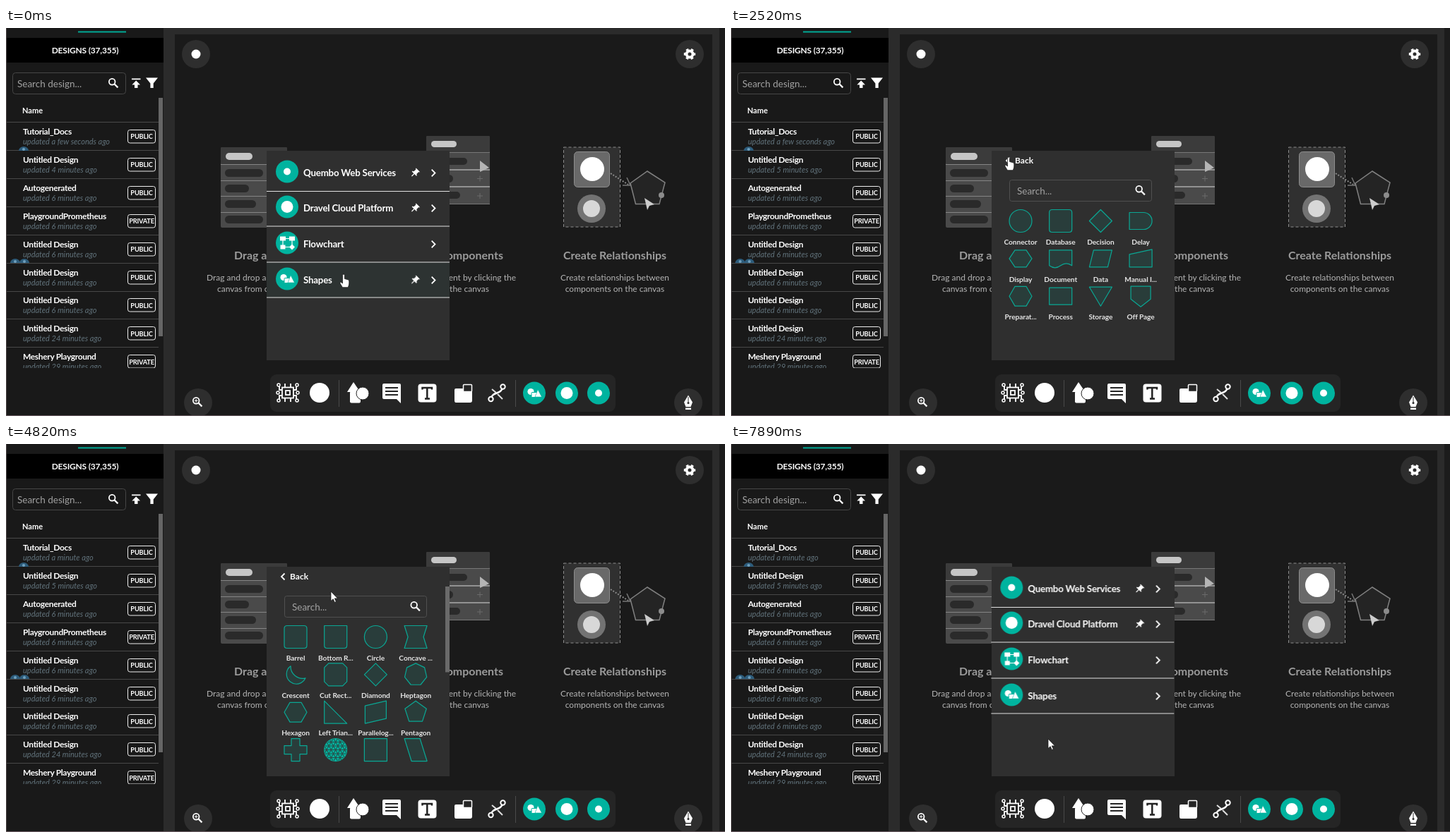
Write an HTML page that moves like this. It is 1018 px wide and 550 px high and loops after 8 s.

```html
<!DOCTYPE html>
<html lang="en">
<head>
<meta charset="utf-8">
<title>Design canvas</title>
<style>
html,body{margin:0;width:100%;height:100%;overflow:hidden;background:#1a1a1a}
svg{display:block}
text{font-family:Lato,"Open Sans",sans-serif;fill:#fff}
.b{font-weight:700}
.mid{text-anchor:middle}
.end{text-anchor:end}
.name{font-size:12px;font-weight:700;letter-spacing:-.35px}
.ago{font-size:11px;font-style:italic;fill:#61727b}
.tag{font-size:9.3px;font-weight:700;letter-spacing:-.2px}
.head{font-size:16px;font-weight:700;fill:#9b9b9b}
.note{font-size:12px;fill:#b4b4b4}
.item{font-size:13.3px;font-weight:700;letter-spacing:-.2px}
.label{font-size:10.2px;font-weight:700;letter-spacing:-.1px;fill:#e4e4e4}
.hint{font-size:13.5px;fill:#a2a2a2}
.line{fill:none;stroke:#fff;stroke-width:1.8}
.shape{fill:#00b39f1c;stroke:#0aa794;stroke-width:1.2;stroke-linejoin:round}

.menu,.flow,.grid,.hoverShapes,.pinShapes,.hoverCloud,.hoverFlow,.tip,.scroll,.thumb,.cursor,
.old1,.new1,.old2,.new2{animation:8s step-end infinite}
.menu{animation-name:menu}
.flow{animation-name:flow}
.grid{animation-name:grid}
.hoverShapes{animation-name:hoverShapes}
.pinShapes{animation-name:pinShapes}
.hoverCloud{animation-name:hoverCloud}
.hoverFlow{animation-name:hoverFlow}
.tip{animation-name:tip}
.scroll{animation-name:scroll}
.thumb{animation-name:thumb}
.cursor{animation-name:cursor}
.strip{transform:translateX(calc(var(--k)*-30px))}
.old1{animation-name:old1}
.new1{animation-name:new1}
.old2{animation-name:old2}
.new2{animation-name:new2}

@keyframes menu{
  0%{opacity:1;transform:none}
  16.75%{opacity:0;transform:none}
  40.3%{opacity:1;transform:translateX(-.7px)}
  53.875%{opacity:0;transform:translateX(-.7px)}
  97.125%,100%{opacity:1;transform:translateX(-.7px)}
}
@keyframes flow{0%{opacity:0}22.375%{opacity:1}36.875%,100%{opacity:0}}
@keyframes grid{0%{opacity:0}57.09%{opacity:1}94%,100%{opacity:0}}
@keyframes hoverShapes{0%{opacity:.07}1.5%{opacity:1}3.125%{opacity:0}43.75%{opacity:1}45.45%{opacity:0}47.15%{opacity:1}53.875%,100%{opacity:0}}
@keyframes pinShapes{0%{opacity:1}3.125%{opacity:0}43.75%{opacity:1}45.45%{opacity:0}47.15%{opacity:1}53.875%,100%{opacity:0}}
@keyframes hoverCloud{0%{opacity:0}8.375%{opacity:1}10.075%,100%{opacity:0}}
@keyframes hoverFlow{0%{opacity:0}10.075%{opacity:1}16.75%,100%{opacity:0}}
@keyframes tip{0%{opacity:0}10.075%{opacity:1}13.5%,100%{opacity:0}}
@keyframes old1{0%{opacity:1}26%,100%{opacity:0}}
@keyframes new1{0%{opacity:0}26%,100%{opacity:1}}
@keyframes old2{0%{opacity:1}38.6%,100%{opacity:0}}
@keyframes new2{0%{opacity:0}38.6%,100%{opacity:1}}
@keyframes scroll{
  0%{transform:none}
  71.75%{transform:translateY(-70px)}
  73.6%{transform:translateY(-200px)}
  75.375%{transform:translateY(-290px)}
  80.75%{transform:translateY(-230px)}
  82.375%{transform:translateY(-120px)}
  84.125%{transform:translateY(-20px)}
  85.75%,100%{transform:none}
}
@keyframes thumb{
  0%{transform:none}
  71.75%{transform:translateY(33px)}
  73.6%{transform:translateY(94px)}
  75.375%{transform:translateY(136.5px)}
  80.75%{transform:translateY(108px)}
  82.375%{transform:translateY(56px)}
  84.125%{transform:translateY(9px)}
  85.75%,100%{transform:none}
}
/* --k picks the pointer: 0 arrow, 1 pointing hand, 2 open hand */
@keyframes cursor{
  0%{transform:translate(478px,349px);--k:1}
  1.5%{transform:translate(520px,356px);--k:1}
  3.125%{transform:translate(610px,420px);--k:0}
  4.925%{transform:translate(699px,514px);--k:1}
  6.65%{transform:translate(650px,425px);--k:0}
  8.375%{transform:translate(606px,250px);--k:1}
  10.075%{transform:translate(579px,303px);--k:1}
  11.625%{transform:translate(603px,302px);--k:1}
  13.5%{transform:translate(604px,303px);--k:1}
  16.75%{transform:translate(604px,303px);--k:0}
  18.6%{transform:translate(608.5px,306px);--k:0}
  24.1%{transform:translate(540px,270px);--k:0}
  26%{transform:translate(460px,222px);--k:0}
  27.9%{transform:translate(412px,196px);--k:0}
  29.625%{transform:translate(399px,187px);--k:1}
  31.5%{transform:translate(393px,183px);--k:1}
  33.375%{transform:translate(390px,181px);--k:1}
  36.875%{transform:translate(390px,181px);--k:0}
  38.6%{transform:translate(405px,190px);--k:0}
  40.3%{transform:translate(460px,225px);--k:1}
  42%{transform:translate(517px,266px);--k:1}
  43.75%{transform:translate(556px,355px);--k:1}
  45.45%{transform:translate(582px,444px);--k:0}
  47.15%{transform:translate(600px,366px);--k:1}
  48.875%{transform:translate(610px,354px);--k:1}
  50.375%{transform:translate(612px,358px);--k:1}
  53.875%{transform:translate(612px,358px);--k:0}
  57.09%{transform:translate(580px,325px);--k:2}
  58.7%{transform:translate(520px,266px);--k:2}
  60.25%{transform:translate(460px,209px);--k:0}
  61.9%{transform:translate(452px,192px);--k:0}
  66.75%{transform:translate(450px,186px);--k:0}
  70%{transform:translate(446px,258px);--k:2}
  71.75%{transform:translate(443px,306px);--k:2}
  85.75%{transform:translate(430px,260px);--k:2}
  87.4%{transform:translate(410px,214px);--k:0}
  89.1%{transform:translate(396px,189px);--k:1}
  90.75%{transform:translate(392px,183px);--k:1}
  94%{transform:translate(392px,183px);--k:0}
  95.5%{transform:translate(410px,262px);--k:0}
  97.125%{transform:translate(435px,356px);--k:1}
  98.625%,100%{transform:translate(449px,418px);--k:0}
}
</style>
</head>
<body>
<svg width="1018" height="550" viewBox="0 0 1018 550">
  <defs>
    <path id="pin" transform="rotate(45) scale(.64) translate(-12 -11.5)" fill="#fff" d="M16 9V4h1c.6 0 1-.4 1-1s-.4-1-1-1H7c-.6 0-1 .4-1 1s.4 1 1 1h1v5c0 1.7-1.3 3-3 3v2h6v7l1 1 1-1v-7h6v-2c-1.7 0-3-1.3-3-3z"/>
    <path id="next" class="line" d="M-2.3-4.8 2.5 0-2.3 4.8"/>
    <g id="lens" class="line"><circle cx="-1.8" cy="-1.8" r="4.3"/><path d="M1.3 1.3 6.4 6.4" stroke-width="2.2"/></g>
    <g id="teal"><circle r="16" fill="#00b39f"/></g>
    <g id="shapesIcon"><use href="#teal"/><circle cx="-5" cy="-2" r="4.6" fill="#fff"/><rect x="-4" y="-1" width="7.5" height="7" rx="1" fill="#fff" stroke="#00b39f"/><path d="M5-5 10.5 5.5H1Z" fill="#fff" stroke="#00b39f" stroke-width=".6"/></g>
    <g id="flowIcon"><use href="#teal"/><path d="M-7-6H7V6M-6-6V6H7" fill="none" stroke="#fff" stroke-width="1.2"/><path d="M-10-9h8v6h-8zM3-9h8v6H3zM-9.500 3h7v6h-7zM7 2l4 4-4 4-4-4z" fill="#fff"/></g>
    <g id="webIcon"><use href="#teal"/><circle r="5" fill="#fff"/></g>
    <g id="cloudIcon"><use href="#teal"/><circle r="8.500" fill="#fff"/></g>
    <clipPath id="listClip"><rect x="0" y="134" width="216" height="348"/></clipPath>
    <clipPath id="viewClip"><rect x="369" y="202" width="259" height="258"/></clipPath>
  </defs>

  <!-- sidebar and canvas -->
  <rect width="1018" height="550" fill="#2b2b2b"/>
  <rect width="223" height="550" fill="#191919"/>
  <rect x="239" y="9" width="761" height="541" fill="#1a1a1a"/>
  <rect x="1010" width="8" height="550" fill="#1c1c1c"/>
  <rect x="102" y="4.500" width="68" height="2" fill="#00a995"/>
  <rect y="14" width="223" height="35" fill="#000"/>
  <text class="b mid" x="112" y="35.500" font-size="12" letter-spacing="-.2">DESIGNS (37,355)</text>
  <rect x="9.500" y="63.500" width="160" height="30" rx="4" fill="none" stroke="#464646"/>
  <text class="hint" x="16" y="83.500">Search design...</text>
  <use href="#lens" x="152" y="78"/>
  <path d="M178 71.500H190.500V73.300H178ZM184.200 74.500 190 80.500H186.500V85H182V80.500H178.400Z" fill="#fff"/>
  <path d="M198 70.500H215L208.700 78.500V85H204.400V78.500Z" fill="#fff"/>
  <text class="b" x="23" y="120.500" font-size="11">Name</text>
  <path d="M1 133.500H217" stroke="#4a4a4a"/>
  <g id="list" clip-path="url(#listClip)"></g>
  <rect x="216" y="99" width="6" height="338" fill="#666"/>

  <!-- hints on the canvas -->
  <rect x="304" y="169" width="94" height="114" rx="2" fill="#4a4a4a"/>
  <path d="M304 193.500H398M304 216.500H398M304 238.500H398M304 261.500H398" stroke="#858585"/>
  <rect x="304" y="169" width="94" height="24" rx="2" fill="#3b3b3b"/>
  <rect x="311" y="177" width="38" height="10" rx="5" fill="#c6c6c6"/>
  <g fill="#2a2a2a"><rect x="310" y="200" width="54" height="11" rx="5.500"/><rect x="310" y="222" width="34" height="11" rx="5.500"/><rect x="310" y="244" width="44" height="11" rx="5.500"/><rect x="310" y="266" width="54" height="11" rx="5.500"/></g>
  <rect x="595" y="153" width="90" height="97" rx="2" fill="#4a4a4a"/>
  <rect x="595" y="153" width="90" height="23" rx="2" fill="#3b3b3b"/>
  <rect x="602" y="160" width="36" height="9" rx="4.500" fill="#c6c6c6"/>
  <path d="M595 176.500H685M595 249.500H685" stroke="#777"/><path d="M595 201H685M595 225H685" stroke="#aaa" stroke-width="1.500"/>
  <g fill="#2a2a2a"><rect x="602" y="184" width="51" height="10" rx="5"/><rect x="602" y="208" width="31" height="11" rx="5.500"/><rect x="602" y="232" width="41" height="10" rx="5"/></g>
  <path d="M667 213.500h8m-4-4v8M667 238h8m-4-4v8" stroke="#6a6a6a"/>
  <path d="M671 188 684 198 671 204Z" fill="#b5b5b5"/>
  <rect x="789.500" y="169" width="80" height="113" fill="#303030" stroke="#8c8c8c" stroke-dasharray="4 3"/>
  <rect x="804.500" y="175.500" width="50" height="50" rx="5" fill="#696969" stroke="#8d8d8d"/>
  <circle cx="830" cy="200" r="17" fill="#fff"/>
  <circle cx="829" cy="256" r="20" fill="#737373"/>
  <circle cx="829" cy="256" r="12" fill="#d8d8d8"/>
  <path d="M856 206 881 222" stroke="#8a8a8a" stroke-width="2" stroke-dasharray="2 2"/>
  <path d="M873 223H884L879 212" fill="none" stroke="#777" stroke-width="1.500"/>
  <path d="M908 203 933 219 925 249.500H891.500L884 220Z" fill="#242424" stroke="#808080" stroke-width="1.500"/>
  <circle cx="928" cy="237" r="4" fill="#8c8c8c"/>
  <path d="M904 241 918 250 911 252 908 258Z" fill="#ccc"/>
  <text class="head" x="323" y="328">Drag and Drop</text>
  <text class="note" x="284" y="358">Drag and drop any</text>
  <text class="note" x="299" y="374">canvas from comp</text>
  <text class="head end" x="704" y="328">Components</text>
  <text class="note end" x="722" y="358">component by clicking the</text>
  <text class="note end" x="684" y="374">on the canvas</text>
  <text class="head mid" x="862" y="328">Create Relationships</text>
  <text class="note mid" x="862" y="358">Create relationships between</text>
  <text class="note mid" x="862" y="374">components on the canvas</text>

  <!-- corner buttons -->
  <g fill="#2e2e2e"><circle cx="269" cy="37" r="20"/><circle cx="968" cy="37" r="20"/><circle cx="272" cy="531" r="20"/><circle cx="966" cy="531" r="20"/></g>
  <circle cx="269" cy="37" r="6.500" fill="#fff"/>
  <circle cx="968" cy="37" r="4.500" fill="none" stroke="#fff" stroke-width="4"/>
  <circle cx="968" cy="37" r="7" fill="none" stroke="#fff" stroke-width="2.500" stroke-dasharray="3.660" stroke-dashoffset="1.830"/>
  <use href="#lens" x="271" y="530"/><path d="M267 528.200h4.500M269.200 526v4.500" stroke="#fff"/>
  <path d="M966 520.500 972 530.500 969.500 537H962.500L960 530.500ZM962 538.500H970V541H962Z" fill="#fff"/>
  <path d="M966 523V531" stroke="#2e2e2e"/><circle cx="966" cy="531.500" r="1.500" fill="#2e2e2e"/>

  <!-- dock -->
  <rect x="374" y="491" width="489" height="53" rx="9" fill="#252525"/>
  <path d="M471.500 499V537M721.500 499V537" stroke="#4a4a4a"/>
  <g fill="none" stroke="#fff" stroke-width="1.800"><rect x="391" y="509.500" width="16" height="15"/><rect x="396" y="514" width="6" height="6"/><path d="M391 513H387V506M391 521H387V528M407 513H411V506M407 521H411V528M395 509V504M403 509V504M395 525V530M403 525V530"/></g>
  <g fill="#252525" stroke="#fff" stroke-width="1.500"><circle cx="386" cy="506" r="2"/><circle cx="386" cy="528" r="2"/><circle cx="412" cy="506" r="2"/><circle cx="412" cy="528" r="2"/><circle cx="385" cy="517" r="2"/><circle cx="413" cy="517" r="2"/></g>
  <circle cx="444" cy="517" r="14" fill="#fff"/>
  <g fill="#fff"><path d="M492 502 501.500 516H483Z"/><rect x="487" y="515" width="15" height="16.500" rx="2"/><circle cx="505" cy="518" r="9" stroke="#252525"/></g>
  <path d="M535 504H557Q559 504 559 506V532L553 526H535Q533 526 533 524V506Q533 504 535 504Z" fill="#fff"/>
  <path d="M537 510H555M537 515H555M537 520H555" stroke="#252525" stroke-width="2"/>
  <rect x="583.500" y="504.500" width="26" height="26" rx="4" fill="#fff"/>
  <path d="M589.500 512.500V510H603V512.500M596.300 510V525M593 525.500H600" fill="none" stroke="#222" stroke-width="2.500"/>
  <path d="M637 511H660V528Q660 531 657 531H637Q635 531 635 528V513Q635 511 637 511Z" fill="#fff"/>
  <rect x="647.500" y="505.500" width="12" height="10" rx="1" fill="#252525" stroke="#fff" stroke-width="1.500"/>
  <path d="M687 525C688 515 702 520 703 509" fill="none" stroke="#fff" stroke-width="2.500"/>
  <g fill="#252525" stroke="#fff" stroke-width="2"><circle cx="703.500" cy="508.500" r="3.200"/><circle cx="686.500" cy="526" r="3.200"/></g>
  <path d="M688 512 694 517M696 519 703 526" stroke="#ddd" stroke-width="2"/>
  <use href="#shapesIcon" x="748" y="517.500"/><use href="#cloudIcon" x="794" y="517.500"/><use href="#webIcon" x="839" y="517.500"/>

  <!-- popup -->
  <rect x="369" y="174" width="259" height="297" fill="#2f2f2f"/>
  <g class="menu">
    <rect class="hoverCloud" x="369" y="231" width="259" height="50" fill="#1b776a"/>
    <g class="hoverFlow"><rect x="369" y="281" width="259" height="51" fill="#1b776a"/><use href="#pin" x="579" y="306.500"/></g>
    <rect class="hoverShapes" x="369" y="332" width="259" height="50" fill="#1b776a"/>
    <path d="M369 231.500H628M369 281H628M369 332H628M369 382H628" stroke="#e2e2e2"/>
    <g id="items"></g>
    <use href="#pin" x="579" y="205.500"/><use href="#pin" x="579" y="255.500"/>
    <use class="pinShapes" href="#pin" x="579" y="357.500"/>
    <g class="tip"><path d="M547 261H611Q614 261 614 264V282H584L579 287 574 282H544V264Q544 261 547 261Z" fill="#343434"/><text class="mid" x="579" y="273" font-size="11" fill="#a6a6a6" style="fill:#a6a6a6">Pin To Dock</text></g>
  </g>
  <g class="flow"><g id="flowTop"></g><g id="flowCells"></g></g>
  <g class="grid">
    <path class="line" d="M394.500 183.500 390 188 394.500 192.500"/>
    <text class="b" x="402" y="192" font-size="12">Back</text>
    <g clip-path="url(#viewClip)"><g class="scroll"><g id="gridTop"></g><g id="gridCells"></g></g></g>
    <rect class="thumb" x="622" y="202" width="6" height="121.500" fill="#6a6a6a"/>
  </g>

  <rect width="1" height="550" fill="#4d4648"/>
  <rect y="549" width="1018" height="1" fill="#6b5c62"/>

  <g class="cursor">
    <svg x="-10" y="-10" width="30" height="34">
      <g class="strip" fill="#fff" stroke="#111" stroke-width=".7">
        <path transform="translate(10 10)" d="M0 0V13.500L3.200 10.700 5.300 15.400 7.400 14.500 5.300 9.900H9.500Z"/>
        <path transform="translate(40 10)" d="M-1.500 1.500Q-1.500 0 0 0T1.500 1.500V6.500L6.200 7.800Q7.800 8.400 7.800 10V13Q7.800 15 6.300 18.700H-1.500L-5 13Q-5.500 10.800-4 11L-1.500 13Z"/>
        <g transform="translate(70 10)" stroke="none"><path d="M-3 9V2.800M-.6 8V1.200M1.800 8V1.400M4.200 9V3" stroke="#fff" stroke-width="1.800" stroke-linecap="round"/><path d="M-4 6.500H5.100V9.500L3 13.300H-2.500L-6.200 8.800Q-6.500 7-5 7.500L-4 8.500Z"/></g>
      </g>
    </svg>
  </g>
</svg>

<script>
const put = (id, html) => document.getElementById(id).innerHTML = html;
const text = (cls, x, y, s) => `<text class="${cls}" x="${x}" y="${y}">${s}</text>`;

// Sidebar list
const designs = [
  ['Tutorial_Docs', 'a few seconds', 'PUBLIC', 'a minute'],
  ['Untitled Design', '4 minutes', 'PUBLIC', '5 minutes'],
  ['Autogenerated', '6 minutes', 'PUBLIC'],
  ['PlaygroundPrometheus', '6 minutes', 'PRIVATE'],
  ['Untitled Design', '6 minutes', 'PUBLIC'],
  ['Untitled Design', '6 minutes', 'PUBLIC'],
  ['Untitled Design', '6 minutes', 'PUBLIC'],
  ['Untitled Design', '24 minutes', 'PUBLIC'],
  ['Meshery Playground', '29 minutes', 'PRIVATE']
];
const avatar = (x, y) => `<path d="M${x - 7} ${y}a7 6 0 0 1 14 0Z" fill="#2d5c7b"/><circle cx="${x}" cy="${y - 2}" r="2" fill="#6fa0bd"/>`;
put('list', designs.map(([name, age, access, later], i) => {
  const y = 39.9 * i, ago = (cls, s) => text('ago ' + cls, 24, 165 + y, `updated ${s} ago`);
  const n = 2 - i;
  return text('name', 24, 151 + y, name) +
    (later ? ago('old' + n, age) + ago('new' + n, later) : ago('', age)) +
    `<rect x="172.5" y="${Math.round(144 + y) + .5}" width="39" height="18.5" rx="3" fill="none" stroke="#eee"/>` +
    text('tag mid', 192, 157.3 + y, access) +
    `<path d="M1 ${Math.round(173 + y) + .5}H217" stroke="#484848"/>`;
}).join('') + avatar(25, 174) + avatar(13, 333) + avatar(26, 333));

// Popup menu
put('items', [
  ['webIcon', 'Quembo Web Services', 205],
  ['cloudIcon', 'Dravel Cloud Platform', 255],
  ['flowIcon', 'Flowchart', 306],
  ['shapesIcon', 'Shapes', 357]
].map(([icon, name, y]) =>
  `<use href="#${icon}" x="398" y="${y - 1.5}"/>${text('item', 421, y + 4.8, name)}<use href="#next" x="605" y="${y + .5}"/>`
).join(''));

// Shape outlines, about 32 px wide around 0,0
const ring = (n, turn = -90, r = () => 16) => 'M' + Array.from({length: n}, (_, i) => {
  const a = (turn + 360 * i / n) * Math.PI / 180;
  return (r(i) * Math.cos(a)).toFixed(1) + ' ' + (r(i) * Math.sin(a)).toFixed(1);
}).join('L') + 'Z';
const box = 'M-16-16H16V16H-16Z';
const round = 'M-16-12q0-4 4-4H12q4 0 4 4V12q0 4-4 4H-12q-4 0-4-4Z';
const disc = 'M-16 0a16 16 0 1 1 32 0a16 16 0 1 1-32 0Z';
const tag = 'M-16-16H5L16 0 5 16H-16Z';
const tri = 'M-2-13Q0-16 2-13L15 11Q17 16 12 16H-12Q-17 16-15 11Z';
const slant = 'M-10-12H16L10 12H-16Z';
const shapes = [
  ['Barrel', round], ['Bottom R...', 'M-16-16H16V12q0 4-4 4H-12q-4 0-4-4Z'], ['Circle', disc],
  ['Concave ...', 'M-16-16H16L11 0 16 16H-16L-11 0Z'],
  ['Crescent', 'M-7-12A14 14 0 1 0 14 5A17 17 0 0 1-7-12Z'],
  ['Cut Rect...', 'M-10-16H10L16-10V10L10 16H-10L-16 10V-10Z'], ['Diamond', ring(4)], ['Heptagon', ring(7)],
  ['Hexagon', ring(6, 0)], ['Left Trian...', 'M-16-16V16H16Z'],
  ['Parallelog...', 'M-15-9L15-16V9L-15 16Z'], ['Pentagon', ring(5)],
  ['Plus', 'M-6-16H6V-6H16V6H6V16H-6V6H-16V-6H-6Z'], ['Polygon', disc, 'mesh'], ['Rectangle', box],
  ['Rhomboid', 'M-16-16H6L16 16H-6Z'],
  ['Right Rho...', 'M-6-16H16L10 16H-14Z'], ['Right Tria...', 'M16-16V16H-16Z'], ['Round Di...', ring(4)],
  ['Round He...', ring(7)],
  ['Round He...', ring(6, 0)], ['Round O...', ring(8, 22.5)], ['Round Pe...', ring(5)], ['Round Re...', round],
  ['Round Tag', tag, 'bold'], ['Round Tri...', tri], ['Section', box], ['Slanted P...', 'M-6-9L16-17 10 9-16 17Z'],
  ['Star', ring(10, -90, i => i % 2 ? 7 : 16.5)], ['Tag', tag, 'bold'], ['Trapezoid', 'M-8-14H8L15 14H-15Z'],
  ['Triangle', tri],
  ['Vee', 'M-16-16L0-8 16-16 0 16Z'], ['X Wing', 'M-16-11H-10L0-3 10-11H16L6 0 16 11H10L0 3-10 11H-16L-6 0Z']
];
const flow = [
  ['Connector', disc], ['Database', round], ['Decision', ring(4)], ['Delay', 'M-16-12H4a12 12 0 0 1 0 24H-16Z'],
  ['Display', 'M-16 0-8-12H8L16 0 8 12H-8Z'], ['Document', 'M-16-12H16V10Q8 4 0 10T-16 10Z'], ['Data', slant],
  ['Manual I...', 'M-16-6 16-13V12H-16Z'],
  ['Preparat...', ring(6, 0)], ['Process', 'M-16-12H16V12H-16Z'], ['Storage', 'M-16-13H16L0 14Z'], ['Off Page', 'M-14-14H14V4L0 15-14 4Z']
];
const mesh = [0, 60, 120].map(a =>
  `<path transform="rotate(${a})" d="M-15-5.500H15M-16 0H16M-15 5.500H15M-11-11H11M-11 11H11" stroke="#2b4a46" stroke-width="1"/>`).join('');
const cell = ([name, d, look], i) => {
  const x = i < 32 ? 410 + 56.7 * (i % 4) : 438.5 + 113 * (i - 32);
  const y = 273.5 + 53.35 * Math.floor(i / 4);
  const style = look === 'bold' ? 'stroke-width:2' : look === 'mesh' ? 'fill:#00b39f' : '';
  return `<g transform="translate(${x} ${y})"><path class="shape" style="${style}" d="${d}"/>${look === 'mesh' ? mesh : ''}${text('label mid', 0, 33, name)}</g>`;
};
const search = '<rect x="394.500" y="215.500" width="201" height="30" rx="3" fill="none" stroke="#505050"/>' +
  text('hint', 405, 235.5, 'Search...') + '<use href="#lens" x="579.500" y="230"/>';
const back = '<path class="line" d="M394.500 183.500 390 188 394.500 192.500"/><text class="b" x="402" y="192" font-size="12">Back</text>';

put('gridTop', search);
put('gridCells', shapes.map(cell).join(''));
put('flowTop', back + search);
put('flowCells', flow.map(cell).join(''));
</script>
</body>
</html>
```
